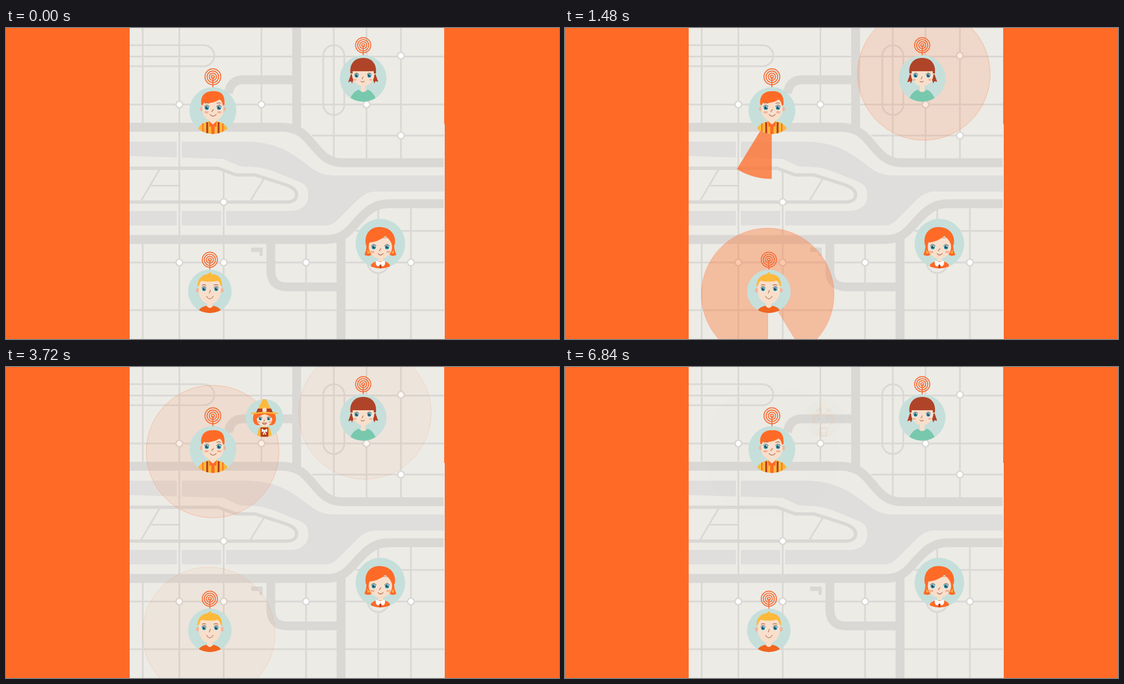
An HTML page for the animation above (6920 ms loop, 997 px wide and 561 px high).

```html
<!DOCTYPE html>
<html lang="en">
<head>
<meta charset="utf-8">
<title>Map with people</title>
<style>
html, body { margin: 0; width: 100%; height: 100%; overflow: hidden; background: #ff6b27; }
svg { display: block; width: 100%; height: 100%; }
.road { fill: none; stroke: #d9d8d5; stroke-width: 16; }
.street { fill: none; stroke: #d9d8d5; stroke-width: 3; }
.lane { fill: none; stroke: #d9d8d5; stroke-width: 6; stroke-linejoin: round; }
.bridge { fill: none; stroke: #ecebe6; stroke-width: 9; }
.stop { fill: #fff; stroke: #d9d8d5; stroke-width: 2.6; }
.pin { fill: none; stroke: #f56a31; stroke-width: 1.7; }
.ink { fill: none; stroke: #b9785c; stroke-width: 1.3; stroke-linecap: round; stroke-linejoin: round; }
.skin { fill: #f8dfcb; }
.pink { fill: #f3b59b; }
.red { fill: #ff6b27; }
.gold { fill: #fcb93b; }
.brown { fill: #b23f25; }
</style>
</head>
<body>
<svg viewBox="0 0 997 561" preserveAspectRatio="none">
  <defs><clipPath id="frame"><path d="M223 0H790V173H791V561H223Z"/></clipPath></defs>
  <rect width="997" height="561" fill="#ff6b27"/>
  <g clip-path="url(#frame)">
    <rect x="223" width="568" height="561" fill="#ecebe6"/>
    <path fill="#dfdedd" d="M223 205H435C488 206 516 225 546 249C562 261 574 266 592 266H790V295H668C648 295 640 304 622 322L600 344C592 352 587 356 576 356H223V330H512C534 330 545 318 545 302C545 288 541 283 528 277L491 262C478 257 470 254 458 252C440 249 430 252 418 248L392 236L223 231Z"/>
    <path class="bridge" d="M312.5 200V240M312.5 326V360M392.5 326V360"/>
    <path class="street" d="M246.5 0V173M246.5 387V561M312.5 0V561M392.5 256V561M460.5 0V173M541 387V561M591 0V237M650 0V237M712 0V237M671 323V350M671 442V561M730 323V561
      M223 51.5H518M530 51.5H790M223 138H518M530 138H790M552 194H790M630 366H790M223 423H471M484 423H598M610 423H790M223 509H598M610 509H790
      M277 255L244 311M262 284.5H312M465 272L441 311"/>
    <path class="street" d="M223 31H356.5A19 19 0 0 1 356.5 69H223"/>
    <rect class="street" x="572" y="31" width="38" height="126" rx="19"/>
    <rect class="street" x="652" y="380" width="38" height="62" rx="19"/>
    <path class="lane" d="M223 253H382L415 265H449L502 282C518 287 524 293 524 301C524 309 517 314 505 314H223"/>
    <path class="road" d="M223 179H496C528 179 540 194 554 211C570 231 583 243 606 243H789M524 0V184M401 118C403 102 412 93.5 427 93.5H518
      M223 381.5H578C604 381 615 370 629 354C650 330 664 317 690 317H789M604 376V561M477.5 386V437Q477.5 467 507 467H598"/>
    <path fill="#d9d8d5" d="M442 396H463V411H457V404H442Z"/>
    <g id="stops"></g>
    <g id="sweeps"></g>
  </g>
  <g id="people"></g>
  <path id="dash" fill="none" stroke="#ea5a1f" stroke-width="1.6"/>
</svg>
<script>
const LOOP = 6920, STEP = 40;
const $ = id => document.getElementById(id);
const clamp = v => Math.max(0, Math.min(1, v));
const circle = (x, y, r, cls) => `<circle cx="${x}" cy="${y}" r="${r}" class="${cls}"/>`;
const shape = (cls, d) => `<path class="${cls}" d="${d}"/>`;

$('stops').innerHTML = [[312.5, 138], [460.5, 138], [650, 138], [712, 50], [712, 194],
  [392.5, 314], [312.5, 423], [392.5, 423], [541, 423], [730, 423]]
  .map(([x, y]) => circle(x, y, 6, 'stop')).join('');

// Face parts are placed around the centre of each badge.
const eye = (x, y, r) => `<circle cx="${x}" cy="${y}" r="${r}" fill="#fff"/>
  <circle cx="${x}" cy="${y}" r="${r * .8}" fill="#3f97a6"/>
  <circle cx="${x}" cy="${y}" r="${r * .42}" fill="#20404f"/>
  <circle cx="${x + r * .3}" cy="${y - r * .3}" r="${r * .2}" fill="#fff"/>
  <path d="M${x - r} ${y - r * .4}Q${x} ${y - r * 1.7} ${x + r} ${y - r * .4}" fill="none" stroke="#6d5a55"/>`;
const eyes = (x1, x2, y, r) => eye(x1, y, r) + eye(x2, y, r);

const pin = (y, r, foot) =>
  [.2, .46, .73, 1].map(k => circle(0, y, r * k, 'pin')).join('') + shape('pin', `M0 ${y}V${foot}`);

function badge(name, x, y, r, parts, top = '') {
  return `<g id="${name}" transform="translate(${x} ${y})">${top}
    <clipPath id="${name}-clip"><circle r="${r}"/></clipPath>
    <circle r="${r}" fill="#c6dfdb"/><g clip-path="url(#${name}-clip)">${parts}</g></g>`;
}

const boy =
  shape('skin', 'M-6 12H6V26H-6Z') +
  shape('gold', 'M-27 33Q-22 22 -7 19L0 27L7 19Q22 22 27 33V44H-27Z') +
  shape('red', 'M-7 19L0 25L7 19L6 30L0 26L-6 30ZM-3 26H3V44H-3ZM-19 23H-17V44H-19ZM17 23H19V44H17Z') +
  shape('brown', 'M-12 21H-8.5V44H-12ZM8.5 21H12V44H8.5Z') +
  circle(-19.5, -3, 4, 'pink') + circle(19.5, -3, 4, 'pink') +
  shape('skin', 'M-19 -20H19V-1C19 12 8 19 0 19S-19 12 -19 -1Z') +
  shape('red', 'M-21 -11C-23 -28 -13 -36 2 -35C16 -35 22 -28 21 -10L18 -9Q17 -17 12 -20Q0 -12 -16 -14L-19 -9Z') +
  shape('pink', 'M-15 1H-8V5H-15ZM8 1H15V5H8Z') +
  eyes(-11, 11, -5, 5) +
  shape('ink', 'M-14 -13Q-11 -15 -7 -13M7 -13Q11 -15 14 -13M1 -2L-2 2M-5 7Q0 13 6 7');

const bobGirl =
  shape('brown', 'M-22 -8L-27 7L-22 5L-20 9L-16 -3ZM22 -8L27 6L22 5L20 9L16 -3Z') +
  shape('skin', 'M-4 10H4V26H-4Z') +
  `<path fill="#78c8ae" d="M-24 38Q-20 25 -8 20Q0 29 8 20Q18 24 23 37L14 44H-16Z"/>` +
  shape('skin', 'M-20 -20H20V-7C20 6 9 14 0 14S-20 6 -20 -7Z') +
  `<path fill="#b04428" d="M-23 -9C-25 -27 -15 -37 0 -37S25 -27 23 -9H19V-13H-19V-9Z"/>` +
  eyes(-12, 11, -5, 4.6) +
  shape('pink', 'M-17 1H-12V4H-17ZM11 1H16V4H11Z') +
  shape('ink', 'M0 -3L-2 1M-4 5Q-1 8 2 5');

const blond =
  circle(-21, -2, 4, 'pink') + circle(21, -2, 4, 'pink') +
  shape('skin', 'M-5 14H5V32H-5Z') +
  `<path fill="#f0651f" d="M-20 34Q-16 28 -6 26Q0 34 6 26Q16 28 20 34L13 42H-13Z"/>` +
  shape('skin', 'M-20 -20Q0 -30 20 -20V-1C20 14 9 23 0 23S-20 14 -20 -1Z') +
  shape('gold', 'M-22 -8C-23 -22 -14 -30 -4 -31L1 -35L3 -31C16 -31 23 -22 22 -8L19 -11Q18 -17 14 -19Q0 -16 -15 -19Q-19 -15 -19 -11Z') +
  eyes(-10.5, 11.5, -4, 4.7) +
  shape('ink', 'M-14 -11Q-10 -13 -7 -11M7 -11Q11 -13 15 -11M1 -2L-1 3M-6 9Q0 18 6 9');

const redhead =
  shape('red', 'M-24 -12C-25 5 -25 12 -29 20Q-20 25 -14 18L15 18Q21 25 29 20C24 12 25 2 24 -10Z') +
  shape('skin', 'M-4 18H5V36H-4Z') +
  shape('red', 'M-17 38Q-13 33 -6 32H7Q13 33 17 38V46H-17Z') +
  `<path fill="#fff" d="M0 33L-8 31Q-10 39 -4 41Q0 40 0 36Q1 40 4 41Q10 39 8 31Z"/>` +
  shape('brown', 'M-1.5 38H1.5V44H-1.5Z') +
  shape('gold', 'M-24 11L-19 17L-23 18ZM24 11L20 17L24 18Z') +
  shape('skin', 'M-21 -10H21V6C21 20 9 27 0 27S-21 20 -21 6Z') +
  shape('red', 'M-26 3C-30 -18 -18 -30 -2 -30C19 -30 29 -15 26 2L21 4Q20 -5 9 -14Q-4 -3 -20 -2L-21 5Z') +
  shape('pink', 'M-19 13H-11V17H-19ZM11 13H18V17H11Z') +
  eyes(-12, 12, 6.5, 5) +
  shape('ink', 'M1 9L-2 13M-4 18Q0 23 5 18');

const hatGirl =
  shape('red', 'M-18 -9C-23 1 -21 11 -13 13H13C21 11 23 1 18 -9Z') +
  shape('skin', 'M-3 10H3V20H-3Z') +
  shape('gold', 'M-14 36L-10 18Q0 13 10 18L14 36Z') +
  shape('brown', 'M-7 17H7V36H-7Z') +
  shape('skin', 'M-14 -8H14V1C14 10 7 15 0 15S-14 10 -14 1Z') +
  shape('red', 'M-16 -8H16L15 3Q12 -4 0 -7Q-11 -4 -15 3Z') +
  shape('gold', 'M-3 -34Q0 -36 3 -34L14 -11L25 -9Q24 -6 18 -7Q0 -10 -18 -7Q-24 -6 -25 -9L-14 -11Z') +
  shape('brown', 'M-12 -17H12L15 -10Q0 -13 -15 -10Z') +
  circle(0, -14.5, 4, 'skin') +
  eyes(-7.5, 7.5, 1.5, 3.6) +
  shape('pink', 'M-13 6H-8V9H-13ZM8 6H13V9H8Z') +
  shape('ink', 'M0 3L-1 6M-4 9Q0 14 4 9Z') +
  `<path fill="#fff" d="M0 22L-5 19V26L0 23L5 26V19ZM-1 23L-3 30H-1L0 25L1 30H3L1 23Z"/>`;

$('people').innerHTML =
  badge('boy', 373, 149, 42.2, boy, pin(-61, 14.3, -42)) +
  badge('bob', 644, 91, 42, bobGirl, pin(-60, 13.7, -42)) +
  badge('blond', 367.5, 475, 39.3, blond, pin(-57, 13.7, -39)) +
  badge('redhead', 675, 389, 44.7, redhead) +
  badge('guest', 466, 92, 34, hatGirl);

// Each radar sweep: centre, start time, start and end of its fade-out.
const SWEEP = 1360, RADIUS = 119.5;
const sweeps = [
  [647, 83, 175, 2900, 4480],
  [365.5, 480.5, 500, 2900, 4480],
  [372.5, 152.5, 1100, 6120, 6880]
].map(([x, y, start, out, end]) => {
  const el = document.createElementNS('http://www.w3.org/2000/svg', 'path');
  el.setAttribute('fill', '#ff6b27');
  el.setAttribute('stroke', '#ff6b27');
  $('sweeps').append(el);
  return { el, x, y, start, out, end };
});

const easeInOut = u => u < .5 ? 4 * u ** 3 : 1 - 4 * (1 - u) ** 3;
const easeOut = u => 1 - (1 - u) ** 2;
const fade = (t, a, b) => 1 - clamp((t - a) / (b - a));

// Pie slice that opens clockwise from straight down.
function slice(x, y, part) {
  const r = RADIUS;
  if (part > .9995) return `M${x} ${y + r}A${r} ${r} 0 1 1 ${x} ${y - r}A${r} ${r} 0 1 1 ${x} ${y + r}Z`;
  const a = part * 2 * Math.PI;
  return `M${x} ${y}V${y + r}A${r} ${r} 0 ${+(part > .5)} 1 ${x - r * Math.sin(a)} ${y + r * Math.cos(a)}Z`;
}

function draw(t) {
  for (const s of sweeps) {
    const age = t - s.start;
    const left = fade(t, s.out, s.end);
    s.el.style.display = age > 0 && left > 0 ? '' : 'none';
    s.el.setAttribute('d', slice(s.x, s.y, easeInOut(clamp(age / SWEEP))));
    s.el.setAttribute('fill-opacity', Math.max(.115, 1 - age * .00065) * left);
    s.el.setAttribute('stroke-opacity', .32 * left);
  }
  $('guest').style.opacity = clamp((t - 1960) / 520) * fade(t, 6120, 6880);

  const head = easeOut(clamp((t - 4520) / 615)), tail = easeOut(clamp((t - 4604) / 615));
  const at = p => `${605 - 69 * p} ${339.5 - 53.5 * p}`;
  $('dash').setAttribute('d', head > tail ? `M${at(tail)}L${at(head)}` : '');
}

const begin = performance.now();
function tick() {
  const t = (performance.now() - begin) % LOOP;
  draw(t - t % STEP);
  requestAnimationFrame(tick);
}
draw(0);
tick();
</script>
</body>
</html>
```
